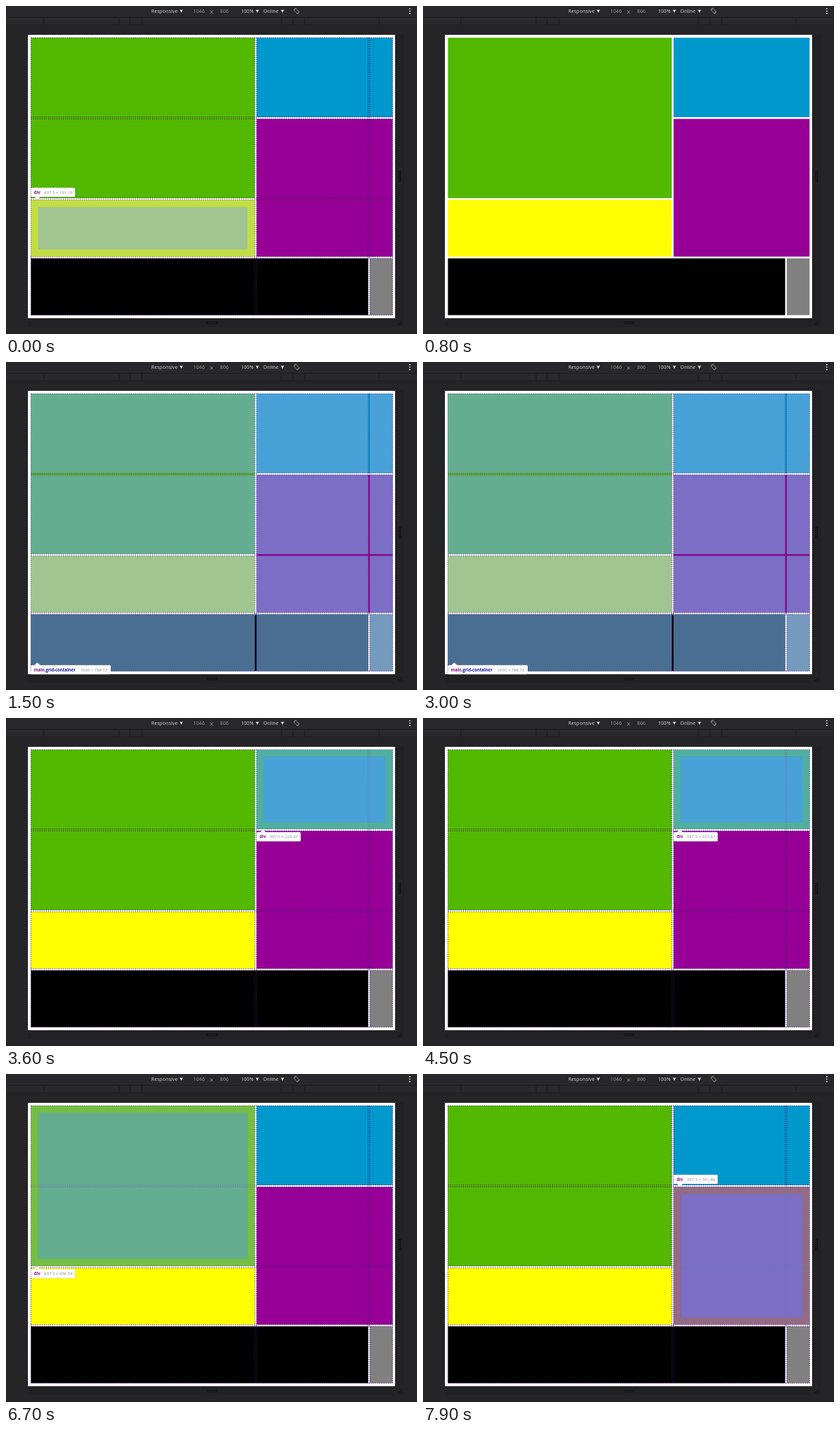
Write an HTML page that moves like this. It is 600 by 478 pixels and loops after 8 s.

```html
<!DOCTYPE html>
<html lang="en">
<head>
<meta charset="utf-8">
<title>Grid inspector</title>
<style>
html, body { margin: 0; width: 100%; height: 100%; overflow: hidden; background: #252427; }
svg { display: block; width: 600px; height: 478px; font-family: "Open Sans", "Noto Sans", sans-serif; }
.bar { font-size: 7.3px; fill: #d2d2d4; }
.bar .dim { fill: #98989b; }
.tip { font-size: 6.1px; }
.tip .tag { font-weight: 700; fill: #881280; }
.tip .cls { fill: #1a1aa6; }
.tip .size { fill: #8a8a8a; }
.content { fill: rgba(111, 168, 220, .66); }
.padding { fill: rgba(147, 196, 125, .55); }
.lines { stroke: rgba(75, 25, 120, .85); stroke-width: .9; stroke-dasharray: 1.7 1.4; fill: none; }
.state { opacity: 0; animation: 8s step-end infinite; }
#lines { animation-name: lines; }
#yellow { animation-name: yellow; }
#main { animation-name: main; }
#blue { animation-name: blue; }
#green { animation-name: green; }
#purple { animation-name: purple; }
@keyframes lines { 0%, 16.25% { opacity: 1 } 5% { opacity: 0 } 100% { opacity: 1 } }
@keyframes yellow { 0% { opacity: 1 } 5%, 100% { opacity: 0 } }
@keyframes main { 0%, 43.75%, 100% { opacity: 0 } 16.25% { opacity: 1 } }
@keyframes blue { 0%, 81.25%, 100% { opacity: 0 } 43.75% { opacity: 1 } }
@keyframes green { 0%, 88.75%, 100% { opacity: 0 } 81.25% { opacity: 1 } }
@keyframes purple { 0% { opacity: 0 } 88.75%, 100% { opacity: 1 } }
</style>
</head>
<body>
<svg viewBox="0 0 600 478">
  <rect width="600" height="478" fill="#252427"/>
  <rect width="600" height="16" fill="#28272b"/>
  <rect y="17" width="600" height="10.5" fill="#29282c"/>
  <path d="M0 16.5H600M0 27.5H600M55 17V27M165 17V27M181 17V27M198.500 17V27M402 17V27M419 17V27M436 17V27M545 17V27" stroke="#1d1c1f" fill="none"/>
  <g class="bar">
    <text x="212" y="10.200">Responsive</text>
    <text x="343" y="10.200">100%</text>
    <text x="375.500" y="10.200">Online</text>
    <text class="dim" x="273.500" y="10.200">1046</text>
    <text class="dim" x="312.500" y="10.200">806</text>
    <path d="M253.500 5.500h4.800l-2.400 4.500zM364.500 5.500h4.800l-2.400 4.500zM401.200 5.500h4.800l-2.400 4.500z"/>
    <path d="M298 6.500l4.400 4.400m0-4.400l-4.400 4.400" stroke="#a5a5a8" stroke-width=".8"/>
    <g fill="none" stroke="#97979a" stroke-width=".8">
      <rect x="422.200" y="4" width="3.800" height="6.500" transform="rotate(-45 424.100 7.250)"/>
      <path d="M420 6.500a4.300 4.300 0 0 1 4-3.600M428.300 8a4.300 4.300 0 0 1-4 3.600"/>
    </g>
    <circle cx="589.500" cy="4" r="1"/><circle cx="589.500" cy="7.500" r="1"/><circle cx="589.500" cy="11" r="1"/>
  </g>
  <path d="M569 42h12v413h-12zM32 456h536v12h-536zM569 456h12v12h-12z" fill="#222124"/>
  <path d="M573.500 240v17M575.800 240v17M293 460.700h16M293 463h16M571.500 465l6-6M574.500 465l3-3" stroke="#111113" fill="none"/>
  <rect x="32" y="42" width="536" height="413" fill="#fff"/>
  <g id="page"></g>
</svg>
<script>
const cols = [[36.4, 363.2], [365.8, 528.7], [531.1, 564.4]];
const rows = [[46.2, 161.9], [164.5, 280], [282.5, 365.3], [367.8, 450.4]];

// Box spanning columns a..b and rows c..d
const area = (a, b, c, d) => ({ x: cols[a][0], y: rows[c][0], r: cols[b][1], b: rows[d][1] });
const areas = {
  green: area(0, 0, 0, 1),
  blue: area(1, 2, 0, 0),
  purple: area(1, 2, 1, 2),
  yellow: area(0, 0, 2, 2),
  black: area(0, 1, 3, 3),
  gray: area(2, 2, 3, 3)
};
const fills = {
  green: '#52b800', blue: '#0098cd', purple: '#960096',
  yellow: '#ffff00', black: '#000', gray: '#808080'
};

const path = ({ x, y, r, b }) => `M${x} ${y}H${r}V${b}H${x}Z`;
const inset = (q, n) => ({ x: q.x + n, y: q.y + n, r: q.r - n, b: q.b - n });

function tip(x, y, width, up, label, sizeX, size) {
  const edge = up ? y + .2 : y + 13.3;
  const peak = up ? y - 4 : y + 17.5;
  return `<g class="tip">
    <rect x="${x - .4}" y="${y - .3}" width="${width + .8}" height="14.300" rx="1.800" fill="#000" opacity=".22"/>
    <path d="M${x + 5} ${edge}L${x + 9.3} ${peak}L${x + 13.6} ${edge}Z" fill="#fff"/>
    <rect x="${x}" y="${y}" width="${width}" height="13.500" rx="1.500" fill="#fff"/>
    <text class="tag" x="${x + 4.4}" y="${y + 8.9}">${label}</text>
    <text class="size" x="${x + sizeX}" y="${y + 8.9}">${size}</text></g>`;
}

function hover(name, tipY, up, size) {
  const box = areas[name], inner = inset(box, 10.4);
  return `<g class="state" id="${name}">
    <path class="padding" fill-rule="evenodd" d="${path(box)}${path(inner)}"/>
    <path class="content" d="${path(inner)}"/>
    ${tip(box.x, tipY, 64.500, up, 'div', 19.3, size)}</g>`;
}

const tracks = cols.flatMap((_, c) => rows.map((_, r) => path(area(c, c, r, r)))).join('');
const gridLines = cols.flat().map(x => `M${x} 46.200V450.400`).join('') +
  rows.flat().map(y => `M36.400 ${y}H564.400`).join('');

document.getElementById('page').innerHTML =
  Object.keys(areas).map(n => `<path d="${path(areas[n])}" fill="${fills[n]}"/>`).join('') +
  `<path class="lines state" id="lines" d="${gridLines}"/>` +
  hover('yellow', 264.8, false, '637.5 × 161.19') +
  hover('blue', 166.2, true, '387.5 × 225.67') +
  hover('green', 284.2, true, '637.5 × 456.34') +
  hover('purple', 146.8, false, '387.5 × 391.86') +
  `<g class="state" id="main"><path class="content" d="${tracks}"/>
    ${tip(36.4, 441.7, 116.500, true, 'main<tspan class="cls">.grid-container</tspan>', 72, '1030 × 788.72')}</g>`;
</script>
</body>
</html>
```
